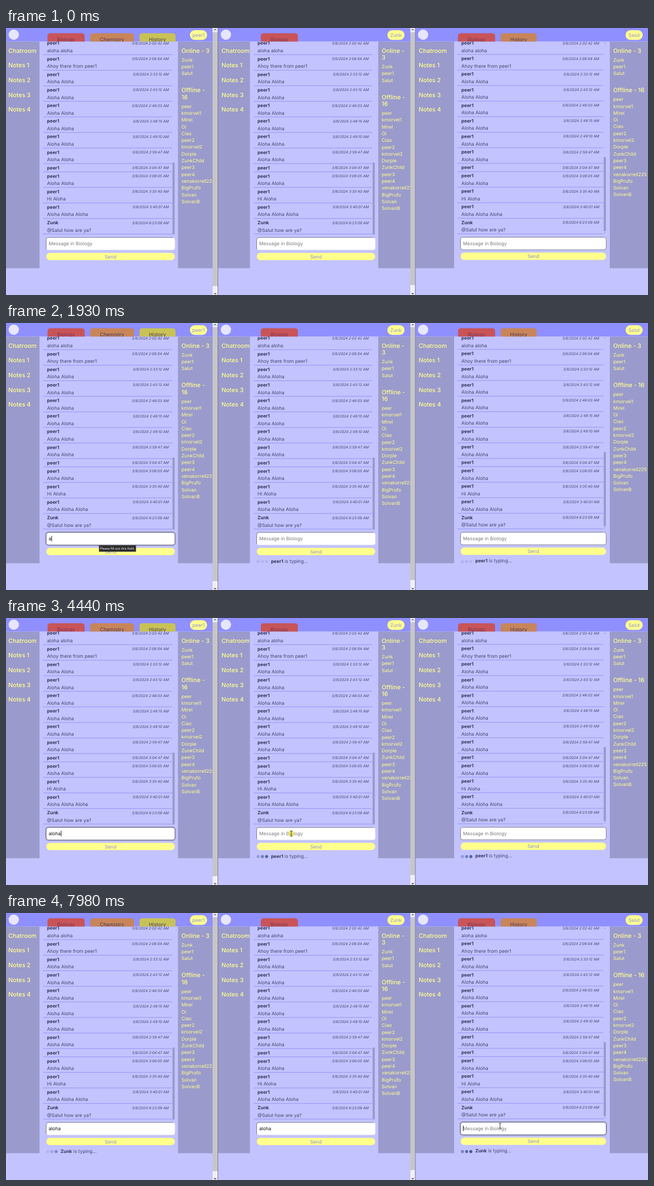
These frames come from a looping animation (1159x483 px, 8 s). An HTML page:

```html
<!DOCTYPE html>
<html lang="en">
<head>
<meta charset="utf-8">
<title>Three chat windows</title>
<style>
  html, body { margin: 0; width: 100%; height: 100%; overflow: hidden; background: #c3c3ff; }
  #stage { display: block; width: 100vw; height: 100vh; }
  text { font-family: Inter, "Open Sans", sans-serif; font-size: 8.6px; text-rendering: geometricPrecision; white-space: pre; }
  .head { font-size: 10.8px; font-weight: 500; fill: #ffff8f; }
  .member { fill: #ffff8f; }
  .name { font-size: 8.3px; font-weight: 700; fill: #34345a; }
  .body { fill: #45456f; }
  .date { font-size: 6.5px; font-style: italic; text-anchor: end; fill: #45456f; }
  .tab { font-size: 9.1px; text-anchor: middle; }
  .mid { text-anchor: middle; fill: #8f8fd8; }
  .tip { font-family: "Noto Sans", sans-serif; font-size: 5.8px; fill: #fff; }
</style>
</head>
<body>
<svg id="stage" viewBox="0 0 1159 483"></svg>
<script>
const LOOP = 8000;
const RED = '#c85458', ORANGE = '#c8855a', OLIVE = '#c8c256';

const online = ['Zunk', 'peer1', 'Salut'];
const offline = ['peer', 'kmorvel1', 'Mirel', 'Oi', 'Ciao', 'peer2', 'kmorvel2', 'Dorple',
  'ZunkChild', 'peer3', 'peer4', 'venakorrell225', 'BigPrufo', 'Solvan', 'SolvanB'];

const twice = 'Aloha Aloha';
const messages = [
  ['2:02:42', 'aloha aloha'], ['2:08:04', 'Ahoy there from peer1'],
  ['2:33:12', twice], ['2:43:12', twice], ['2:46:03', twice], ['2:48:15', twice],
  ['2:49:10', twice], ['2:59:47', twice], ['3:04:47', ''], ['3:06:05', twice],
  ['3:35:40', 'Hi Aloha'], ['3:40:01', 'Aloha Aloha Aloha'],
  ['6:23:09', '@Salut how are ya?', 'Zunk']
];

// x positions of each window's parts; dy is its small vertical shift
const panels = [
  { x0: 0, x1: 373, side: 60.5, right: 310.4, list: [67, 300], thumb: [300.5, 243.5, 130], date: 294,
    box: [72.5, 305], dy: 0, who: 'peer1', pill: 332, wrap: [0, 1], dots: 75.3,
    tabs: [['Biology', 75, 67, RED], ['Chemistry', 152, 79, ORANGE], ['History', 241, 65, OLIVE]] },
  { x0: 383, x1: 730, side: 440.4, right: 672, list: [447, 661], thumb: [661.8, 243.5, 130], date: 655,
    box: [452.5, 666.8], dy: 0, who: 'Zunk', pill: 688.5, wrap: [1, 1], dots: 455.2,
    tabs: [['Biology', 460, 67, RED]] },
  { x0: 739, x1: 1159, side: 809, right: 1090, list: [815, 1078.5], thumb: [1079, 233.5, 134], date: 1071,
    box: [820.5, 1083.5], dy: -0.4, who: 'Salut', pill: 1118.5, wrap: [0, 0], dots: 824,
    tabs: [['Biology', 816, 67, RED], ['History', 893, 65, ORANGE]] }
];

const rect = (x, y, w, h, fill, extra = '') =>
  `<rect x="${x}" y="${y}" width="${w}" height="${h}" fill="${fill}" ${extra}/>`;
const text = (x, y, str, cls, extra = '') =>
  `<text x="${x}" y="${y}" class="${cls}" ${extra}>${str}</text>`;
const clip = (x, y, w, h, inner) =>
  `<svg x="${x}" y="${y}" width="${w}" height="${h}" viewBox="${x} ${y} ${w} ${h}">${inner}</svg>`;

function drawMessages(p) {
  const x = p.list[0] + 7;
  let top = 20.05 + p.dy, out = '';
  for (const [time, body, name = 'peer1'] of messages) {
    const end = top + (body ? 28.15 : 14.9);
    out += text(x, top + 10.4, name, 'name') + text(p.date, top + 9.9, `3/8/2024 ${time} AM`, 'date');
    out += text(x, top + 24, body, 'body');
    out += rect(p.list[0], end - 0.5, p.list[1] - p.list[0], 1, '#9494f8');
    top = end;
  }
  const [tx, ty, th] = p.thumb;
  return out + rect(tx, ty, 4, th, '#9a9ac8');
}

function drawMembers(p) {
  const x = p.right + 6.3;
  let y = 44.8, out = '';
  [['Online -', 3, online], ['Offline -', 16, offline]].forEach(([label, count, names], i) => {
    if (p.wrap[i]) {
      out += text(x, y, label, 'head') + text(x, y += 12.4, count, 'head');
    } else {
      out += text(x, y, `${label} ${count}`, 'head');
    }
    y += 15.9;
    names.forEach((name, k) => { out += text(x, y + k * 12.3, name, 'member'); });
    y += (names.length - 1) * 12.3 + 31;
  });
  return out;
}

function drawHeader(p) {
  let out = rect(p.x0, 0, p.x1 - p.x0, 24.5, '#8f8fff');
  out += `<circle cx="${p.x0 + 14}" cy="12" r="9.3" fill="#e6e6ff"/>`;
  p.tabs.forEach(([label, x, w, color], i) => {
    out += rect(x, 9.5, w, 22, color, 'rx="5"');
    out += text(x + w / 2, 23.8, label, 'tab', `fill="${i ? '#4d3a55' : '#7a3650'}"`);
  });
  out += rect(p.pill, 4, 31, 17.5, '#ffff8f', 'rx="8.7"');
  out += text(p.pill + 15.5, 15.9, p.who, 'mid');
  return clip(p.x0, 0, p.x1 - p.x0, 24.5, out);
}

function drawInput(p, i) {
  const [a, b] = p.box, y = 378.9 + p.dy, w = b - a, h = 22.7;
  const plain = i === 2
    ? rect(a, y, w, h, '#fff', 'rx="4" stroke="#7c7c98"')
    : rect(a, y, w, h, '#fff', 'rx="4" stroke="#dedeee"') +
      `<path d="M${a} ${y + 21}V${y + 4}q0-4 4-4H${b - 3}" fill="none" stroke="#7c7c98"/>`;
  const focus = rect(a, y, w, h, 'none', 'rx="4.5" stroke="#55557a" stroke-opacity=".3" stroke-width="3.4"') +
    rect(a, y, w, h, '#fff', 'rx="4" stroke="#66667f"');
  return plain + `<g id="focus${i}">${focus}</g>` +
    text(a + 4.4, 393 + p.dy, '', 'body', `id="field${i}"`) +
    rect(0, 385 + p.dy, 0.9, 10, '#111', `id="caret${i}"`) +
    rect(a + 0.3, 406.7 + p.dy, w - 0.6, 13.3, '#ffff8c', 'rx="6.6"') +
    text((a + b) / 2, 416.5 + p.dy, 'Send', 'mid');
}

function drawNote(p, i) {
  let out = '';
  for (let k = 0; k < 3; k++) out += `<circle id="dot${i}${k}" cx="${p.dots + k * 7.6}" cy="431.6" r="2.8"/>`;
  out += `<text x="${p.dots + 23.2}" y="${433.6 + p.dy}" class="body"><tspan class="name" id="typer${i}"></tspan> is typing...</text>`;
  return `<g id="note${i}">${out}</g>`;
}

function drawPanel(p, i) {
  let out = drawMessages(p);
  out += rect(p.x0, 24.5, p.side - p.x0, 410, '#9a9acc') + rect(p.right, 24.5, p.x1 - p.right, 410, '#9a9acc');
  ['Chatroom', 'Notes 1', 'Notes 2', 'Notes 3', 'Notes 4'].forEach((label, k) => {
    out += text(p.x0 + (i ? 6 : 4.3), 44.8 + k * 26.6, label, 'head');
  });
  out += drawMembers(p) + drawHeader(p) + drawInput(p, i) + drawNote(p, i);
  return clip(p.x0, 0, p.x1 - p.x0, 483, out);
}

function drawScrollbar(x, w, end) {
  const c = x + w / 2;
  const arrow = (y, d) => `<path d="M${c - 2} ${y}l2 ${d}l2 ${-d}" fill="none" stroke="#505050" stroke-width="1.1"/>`;
  return rect(x, 0, w, 483, '#f0f0f2') + rect(x, 7.5, w, end - 7.5, '#c6c6c8') +
    arrow(4.2, -2) + arrow(479.5, 2) + rect(x + w, 0, 1, 483, '#78789f');
}

const $ = id => document.getElementById(id);
$('stage').innerHTML = rect(0, 0, 1159, 483, '#c3c3ff') +
  panels.map(drawPanel).join('') +
  drawScrollbar(373, 9, 467) + drawScrollbar(730, 8.5, 465) +
  rect(1080.3, 27, 1.4, 1, '#66668a') + rect(1080.3, 370, 1.4, 1, '#66668a') +
  `<g id="tip">${rect(168, 402.3, 66.5, 11.2, '#2b2b2b', 'stroke="#555" stroke-width=".6"')}${text(169.8, 410, 'Please fill out this field.', 'tip')}</g>
  <g id="pointer">
    <circle id="halo" r="5.8" fill="#f0e640"/>
    <path id="beam" d="M-2.2-4.6H-.6L0-4L.6-4.6H2.2M0-4V4M-2.2 4.6H-.6L0 4L.6 4.6H2.2" fill="none" stroke="#222" stroke-width=".9"/>
    <path id="arrow" d="M0 0V9.5L2.2 7.5L3.7 10.8L5 10.2L3.6 7H6.6Z" fill="#fff" stroke="#111" stroke-width=".7"/>
  </g>`;

const within = (t, a, b) => t >= a && t < b;
const ramp = (t, a, b) => Math.min(1, Math.max(0, (t - a) / (b - a)));
const show = (id, on) => $(id).setAttribute('visibility', on ? 'visible' : 'hidden');

// typing: key times per window; carets: spans when the caret is lit
const word = 'aloha';
const keys = [[1860, 2010, 2150, 2290, 2430], [5140, 5300, 5460, 5620, 5810], []];
const focusSpans = [[930, 4500], [4500, 7840], [7840, LOOP]];
const carets = [
  [[930, 1490], [1860, 2940], [3440, 3940], [4430, 4500]],
  [[4500, 5030], [5140, 6230], [6720, 7240]],
  [[7840, LOOP]]
];
const notes = [
  [[5310, LOOP, 'Zunk']],
  [[1930, 5300, 'peer1']],
  [[1930, 5300, 'peer1'], [5300, LOOP, 'Zunk', 5560]]
];

// pointer strokes: [time, x, y] points
const strokes = [
  { until: 1860, points: [[200, 712, 470], [560, 430, 408], [920, 176, 393]] },
  { until: 5140, points: [[3400, 176, 393], [3780, 340, 380], [4160, 515, 390]] },
  { until: LOOP, points: [[6870, 515, 390], [7150, 660, 386], [7430, 835.5, 380.5], [7640, 889, 381], [7720, 892, 385]] }
];
const clicks = [[890, 1030, 1100], [4370, 4500, 4580], [7700, 7800, 7860]];

function pointerAt(t) {
  const stroke = strokes.find(s => within(t, s.points[0][0], s.until));
  if (!stroke) return null;
  const pts = stroke.points, n = pts.length - 1;
  const i = pts.findIndex(q => q[0] > t);
  if (i < 0) return pts[n].slice(1);
  const [ta, xa, ya] = pts[i - 1], [tb, xb, yb] = pts[i];
  const f = ramp(t, ta, tb);
  return [xa + (xb - xa) * f, ya + (yb - ya) * f];
}

// a dot lights up in turn, then fades in turn
const rises = [[0, 100], [375, 440], [560, 690]];
function dotColor(k, phase) {
  const start = 720 + 120 * k;
  const lit = ramp(phase, ...rises[k]) - ramp(phase, start, start + 400);
  const mix = (a, b) => Math.round(a + (b - a) * lit);
  return `rgb(${mix(178, 70)},${mix(180, 88)},${mix(240, 154)})`;
}

function updatePanel(p, i, t) {
  const typed = word.slice(0, keys[i].filter(k => t >= k).length);
  const field = $('field' + i);
  field.textContent = typed || 'Message in Biology';
  field.style.fill = typed ? '#111' : '#7b7b80';
  show('focus' + i, within(t, ...focusSpans[i]));
  show('caret' + i, carets[i].some(([a, b]) => within(t, a, b)));
  $('caret' + i).setAttribute('x', p.box[0] + 4.4 + (typed ? field.getComputedTextLength() + 0.3 : 0));

  const note = notes[i].find(([a, b]) => within(t, a, b));
  show('note' + i, note);
  if (!note) return;
  const [from, , who, first = from] = note;
  $('typer' + i).textContent = who;
  const phase = Math.max(0, t - first) % 1500;
  for (let k = 0; k < 3; k++) $(`dot${i}${k}`).setAttribute('fill', dotColor(k, phase));
}

function render(t) {
  panels.forEach((p, i) => updatePanel(p, i, t));
  show('tip', within(t, 1640, 3440));

  const at = pointerAt(t);
  $('pointer').setAttribute('display', at ? 'inline' : 'none');
  if (!at) return;
  const [x, y] = at;
  $('pointer').setAttribute('transform', `translate(${x} ${y})`);
  const overField = y > 374 && y < 402 && panels.some(p => within(x, ...p.box));
  show('beam', overField);
  show('arrow', !overField);
  const click = clicks.find(([a, , c]) => within(t, a, c));
  $('halo').setAttribute('opacity', click ? 0.65 * (1 - ramp(t, click[1], click[2])) : 0);
}

const begin = performance.now();
function tick() {
  render((performance.now() - begin) % LOOP);
  requestAnimationFrame(tick);
}
tick();
</script>
</body>
</html>
```
